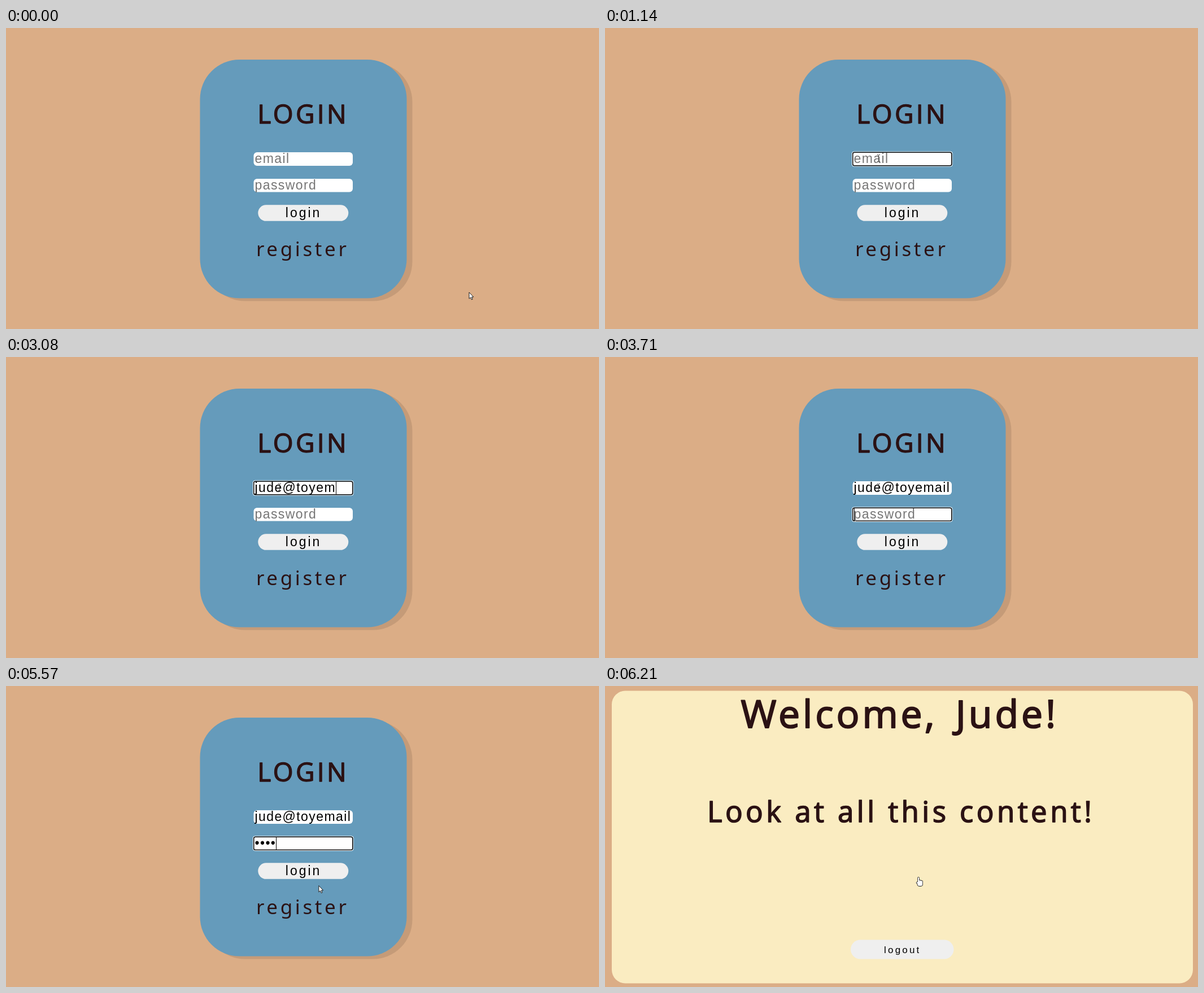
An HTML page with a canvas for the animation above (8.23 s loop, 1050x533 px).

```html
<!DOCTYPE html>
<html lang="en">
<head>
<meta charset="utf-8">
<title>Login</title>
<style>
html, body { margin: 0; width: 100%; height: 100%; overflow: hidden; background: #dbad86; }
canvas { display: block; }
</style>
</head>
<body>
<canvas id="stage" width="1050" height="533"></canvas>
<script>
const ctx = document.getElementById('stage').getContext('2d');

const LOOP = 8230, EMAIL_FOCUS = 610, PASS_FOCUS = 3710, PRESS = 5970, WELCOME = 6210;
const TITLE = '"Open Sans", sans-serif';
const LABEL = '"Noto Sans", sans-serif';
const FORM = '"Liberation Sans", Arial, sans-serif';
const INK = '#2b1214', CREAM = '#faecc1', GREY = '#efefef', HINT = '#757575';

const emailField = { x: 438.5, y: 220, w: 175.5, h: 24 };
const passField = { x: 438.5, y: 267, w: 175.5, h: 23.5 };
const button = { x: 446.3, y: 313.3, w: 160, h: 28.5 };

// Typed in bursts, each at its own steady pace.
const emailBursts = [
  { chars: 'jude', start: 1600, pace: 153 },
  { chars: '@', start: 2310, pace: 0 },
  { chars: 'toyemail', start: 2550, pace: 128 }
];
const passBursts = [{ chars: '••••', start: 4030, pace: 176 }];

// Each move bends toward a control point and advances in even ticks.
const moves = [
  { start: -4, tick: 74, ticks: 6, a: [820, 468], bend: [330, 231], b: [485, 231] },
  { start: 5110, tick: 77, ticks: 7, a: [485, 231], bend: [560, 400], b: [555, 338] }
];

function roundBox(x, y, w, h, r) {
  ctx.beginPath();
  ctx.roundRect(x, y, w, h, r);
}

function box(x, y, w, h, r, color) {
  roundBox(x, y, w, h, r);
  ctx.fillStyle = color;
  ctx.fill();
}

function text(str, x, y, size, family, color, spacing, { bold = 0, word = 0 } = {}) {
  ctx.font = `${size}px ${family}`;
  ctx.letterSpacing = spacing + 'px';
  ctx.wordSpacing = word + 'px';
  ctx.fillStyle = ctx.strokeStyle = color;
  ctx.fillText(str, x, y);
  if (bold) {
    ctx.lineWidth = bold;
    ctx.strokeText(str, x, y);
  }
}

function inside(f, [x, y]) {
  return x >= f.x && x <= f.x + f.w && y >= f.y && y <= f.y + f.h;
}

function pointerAt(t) {
  const { start, tick, ticks, a, bend, b } = moves.filter(m => t >= m.start).pop();
  const s = Math.min(1, Math.floor((t - start) / tick) / ticks);
  const u = s * s * (3 - 2 * s);
  return a.map((v, i) => (1 - u) ** 2 * v + 2 * u * (1 - u) * bend[i] + u * u * b[i]);
}

function arrow() {
  ctx.fillStyle = '#fff';
  ctx.strokeStyle = '#1c1c1c';
  ctx.lineWidth = 1;
  const shape = new Path2D('M0 0V11.3L2.6 9 4.4 13 6.2 12.2 4.5 8.3H7.8Z');
  ctx.fill(shape);
  ctx.stroke(shape);
}

// A fingertip, three knuckles, a thumb and a palm: dark outlines first, then white.
function hand() {
  const shapes = new Path2D();
  shapes.roundRect(-1, 0.8, 2, 11, 1);
  for (let i = 0; i < 3; i++) shapes.roundRect(1.2 + i * 2, 5.8 + i * 0.6, 2, 6, 1);
  shapes.roundRect(-3.4, 9.2, 4, 2.4, 1);
  shapes.roundRect(-1.6, 9.5, 8.8, 6.6, [0, 0, 3, 3]);
  ctx.strokeStyle = '#1c1c1c';
  ctx.lineWidth = 1.6;
  ctx.stroke(shapes);
  ctx.fillStyle = '#fff';
  ctx.fill(shapes);
}

function beam() {
  ctx.fillStyle = '#444';
  ctx.fillRect(-1, -6, 1, 11);
  for (const y of [-7, 5]) {
    ctx.fillRect(-3, y, 2, 1);
    ctx.fillRect(0, y, 2, 1);
  }
}

function cursor(shape, [x, y]) {
  ctx.save();
  ctx.translate(x, y);
  shape();
  ctx.restore();
}

function ring({ x, y, w, h }) {
  const line = (grow, width, color) => {
    roundBox(x - grow, y - grow, w + 2 * grow, h + 2 * grow, 3);
    ctx.lineWidth = width;
    ctx.strokeStyle = color;
    ctx.stroke();
  };
  line(1, 1, '#fff');
  line(-0.2, 1.6, '#101010');
}

function input(f, value, hint, focused, caret) {
  const x = 440.5;
  box(f.x, f.y, f.w, f.h, focused ? 3 : 6, '#fff');
  if (focused) ring(f);
  text(value || hint, x, f.y + 19, 23, FORM, value ? '#000' : HINT, 1.4);
  if (caret) {
    const end = value ? ctx.measureText(value).width : 0.5;
    ctx.fillStyle = '#000';
    ctx.fillRect(Math.round(x + end), f.y + 1, 1, 22);
  }
}

// The text so far, and whether the caret is in the lit half of its blink.
function typing(bursts, focus, t) {
  let value = '', last = focus;
  for (const { chars, start, pace } of bursts) {
    [...chars].forEach((char, i) => {
      const time = start + i * pace;
      if (time > t) return;
      value += char;
      last = time;
    });
  }
  return { value, lit: Math.floor((t - last) / 500) % 2 === 0 };
}

function drawLogin(t) {
  const p = pointerAt(t);
  const hover = inside(button, p);
  const onEmail = t >= EMAIL_FOCUS && t < PASS_FOCUS;
  const onPass = t >= PASS_FOCUS && t < PRESS;
  const email = typing(emailBursts, EMAIL_FOCUS, t);
  const pass = typing(passBursts, PASS_FOCUS, t);

  box(353.5, 61, 366, 422.5, 70, '#c59b78');
  box(343.5, 56, 366, 422.5, 70, '#659bbb');
  text('LOGIN', 445.3, 169.4, 46, TITLE, INK, 4.4, { bold: 1.4 });
  input(emailField, email.value, 'email', onEmail, onEmail && email.lit);
  input(passField, pass.value, 'password', onPass, onPass && pass.lit);

  box(button.x, button.y, button.w, button.h, hover ? 6 : 14.2, hover ? '#8f8642' : GREY);
  if (t >= PRESS) ring(button);
  text('login', 494.8, 335, 23, FORM, hover ? CREAM : '#000', 3);
  text('register', 443, 403.5, 35, LABEL, INK, 4.6);

  const overInput = inside(emailField, p) || inside(passField, p);
  cursor(hover ? hand : overInput ? beam : arrow, p);
}

function drawWelcome(t) {
  box(12, 8.5, 1029, 518, 24, CREAM);
  text('Welcome, Jude!', 240.5, 73.5, 68, TITLE, INK, 4.9, { bold: 2, word: 10 });
  text('Look at all this content!', 181, 240.5, 51, TITLE, INK, 5.42, { bold: 1.6 });
  box(435, 449.5, 182.5, 34, 17, GREY);
  text('logout', 494, 472.5, 17, FORM, '#000', 3.2);
  cursor(hand, pointerAt(t));
}

function frame(now) {
  const t = now % LOOP;
  ctx.lineJoin = 'round';
  ctx.fillStyle = '#dbad86';
  ctx.fillRect(0, 0, 1050, 533);
  (t < WELCOME ? drawLogin : drawWelcome)(t);
  requestAnimationFrame(frame);
}

requestAnimationFrame(frame);
</script>
</body>
</html>
```
